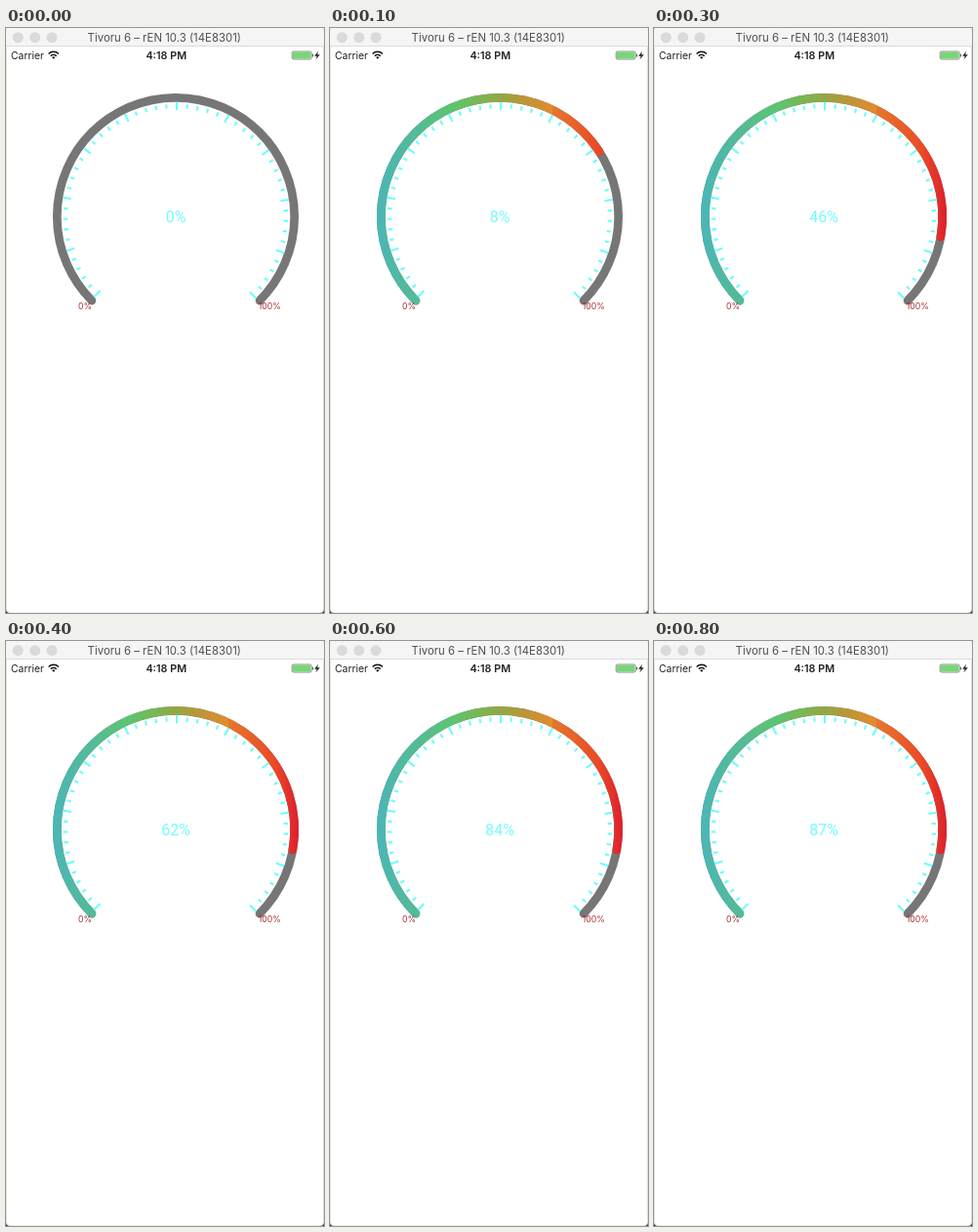
Write an HTML page with a canvas that moves like this. It is 326 px wide and 599 px high and loops after 900 ms.

```html
<!DOCTYPE html>
<html lang="en">
<head>
<meta charset="utf-8">
<title>Gauge</title>
<style>
  html, body { margin: 0; width: 100%; height: 100%; overflow: hidden; background: #fff; }
  canvas { display: block; width: 326px; height: 599px; }
</style>
</head>
<body>
<canvas id="stage"></canvas>
<script>
const W = 326, H = 599, LOOP = 900, STEP = 100;
const CX = 174, CY = 193, R = 121.7;
const START = Math.PI * 0.75, SWEEP = Math.PI * 1.5;
const VALUES = [0, 8, 29, 46, 62, 75, 84, 87, 87];
const FILLS = [0, 0.711, 0.87];
const SANS = 'Inter, "Noto Sans", sans-serif';

const canvas = document.getElementById('stage');
const ctx = canvas.getContext('2d');
const ratio = window.devicePixelRatio || 1;
canvas.width = W * ratio;
canvas.height = H * ratio;
ctx.scale(ratio, ratio);

const heat = ctx.createLinearGradient(48, 0, 300, 0);
[
  [48, '#4bb6b6'], [88, '#53bb97'], [125, '#5cc571'], [150, '#76b855'],
  [174, '#92a745'], [200, '#bd9537'], [228, '#e58a2e'], [228, '#e6772c'],
  [275, '#ea4a26'], [300, '#dc202e']
].forEach(([x, color]) => heat.addColorStop((x - 48) / 252, color));

function text(str, x, y, font, color, align = 'center') {
  ctx.font = font;
  ctx.fillStyle = color;
  ctx.textAlign = align;
  ctx.fillText(str, x, y);
}

function arc(x, y, r, from, to, width, color, cap = 'butt') {
  ctx.beginPath();
  ctx.arc(x, y, r, from, to);
  ctx.lineWidth = width;
  ctx.lineCap = cap;
  ctx.strokeStyle = color;
  ctx.stroke();
}

function dot(x, y, r, color) {
  ctx.beginPath();
  ctx.arc(x, y, r, 0, Math.PI * 2);
  ctx.fillStyle = color;
  ctx.fill();
}

function box(x, y, w, h, r, color) {
  ctx.beginPath();
  ctx.roundRect(x, y, w, h, r);
  ctx.fillStyle = color;
  ctx.fill();
}

function drawWindow() {
  box(0, 0, W, H, 0, '#fff');
  box(0, H - 5, W, 5, 0, '#3a3a3a');
  box(0, 0, W, H, [0, 0, 4, 4], '#d9d9d9');
  box(0.6, 0, W - 1.4, H - 0.6, [0, 0, 4, 4], '#fff');
  box(0, 0, W, 19, [4, 4, 0, 0], '#f5f5f5');
  box(0, 18.3, W, 0.8, 0, '#d4d4d4');
  [12.3, 29.7, 47].forEach(x => dot(x, 9.7, 5.5, '#dadada'));
  text('Tivoru 6 – rEN 10.3 (14E8301)', 162.3, 13.8, '11.4px ' + SANS, '#505050');
}

function drawWifi() {
  const mid = -Math.PI / 2, half = 0.78;
  [4.2, 7.3].forEach(r => arc(48.8, 31.6, r, mid - half, mid + half, 1.5, '#111'));
  ctx.beginPath();
  ctx.moveTo(48.8, 31.8);
  ctx.arc(48.8, 31.8, 2.4, mid - half, mid + half);
  ctx.fillStyle = '#111';
  ctx.fill();
}

function drawBattery() {
  ctx.beginPath();
  ctx.roundRect(293.2, 24, 20, 8, 1.8);
  ctx.lineWidth = 0.8;
  ctx.strokeStyle = '#6a6a6a';
  ctx.stroke();
  box(294, 24.8, 18.4, 6.4, 1, '#74d874');
  box(313.9, 26.4, 1.2, 3.2, 0.6, '#6a6a6a');
  ctx.beginPath();
  [[320, 23.8], [316.2, 28.7], [318.7, 28.7], [317.6, 32.2], [321.8, 27.2], [319.2, 27.2]]
    .forEach(([x, y]) => ctx.lineTo(x, y));
  ctx.fillStyle = '#222';
  ctx.fill();
}

function drawStatus() {
  text('Carrier', 5, 32, '10.4px ' + SANS, '#222', 'left');
  text('4:18 PM', 164.3, 32, '600 10.8px ' + SANS, '#222');
  drawWifi();
  drawBattery();
}

function drawTicks() {
  const gap = SWEEP / 50;
  for (let i = 0; i <= 50; i++) {
    const a = START + gap * i;
    arc(CX, CY, 113, a, a + gap / 5, i % 5 ? 4.4 : 8.7, '#6cfdfd');
  }
}

function drawGauge(fill, value) {
  arc(CX, CY, R, START, START + SWEEP, 8.7, '#767676', 'round');
  if (fill) arc(CX, CY, R, START, START + SWEEP * fill, 8.7, heat, 'round');
  drawTicks();
  text('0%', 81, 288.4, '8.7px ' + SANS, '#a82a2a');
  text('100%', 270.2, 288.4, '8.7px ' + SANS, '#a82a2a');
  text(value + '%', CX, 198.8, '16px Roboto, ' + SANS, '#74fbfd');
}

function frame(now) {
  const step = Math.floor((now % LOOP) / STEP);
  drawWindow();
  drawStatus();
  drawGauge(FILLS[Math.min(step, 2)], VALUES[step]);
  requestAnimationFrame(frame);
}

// Times count from the first painted frame.
requestAnimationFrame(first => {
  const tick = now => {
    frameAt(Math.max(0, now - first));
    requestAnimationFrame(tick);
  };
  tick(first);
});

function frameAt(t) {
  const step = Math.floor((t % LOOP) / STEP);
  drawWindow();
  drawStatus();
  drawGauge(FILLS[Math.min(step, 2)], VALUES[step]);
}
</script>
</body>
</html>
```
